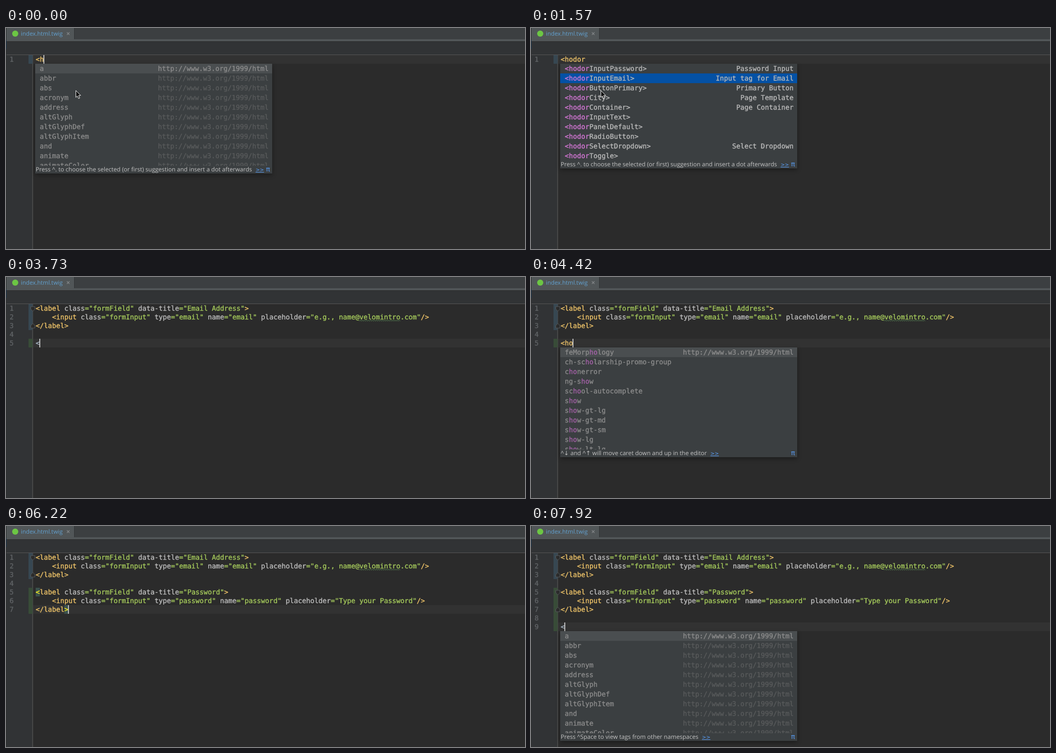
An HTML page that plays this animation: 1014x433 px, repeating every 8000 ms.

```html
<!DOCTYPE html>
<html lang="en">
<head>
<meta charset="utf-8">
<title>Live template completion</title>
<style>
  html, body { margin: 0; height: 100%; overflow: hidden; background: #2b2b2b; }
  svg { display: block; }
  text { white-space: pre; text-rendering: geometricPrecision; }
  .code { font: 13.31px "DejaVu Sans Mono", monospace; stroke-width: .35px; }
  .ui { font: 11.6px "Open Sans", "DejaVu Sans", sans-serif; fill: #c4c4c4; }
  .link { font: 9.8px "DejaVu Sans", sans-serif; fill: #589df6; }
  .popup { fill: #3b3f41; filter: drop-shadow(0 3px 4px rgba(0, 0, 0, .35)); }
</style>
</head>
<body>
<svg width="1014" height="433" viewBox="0 0 1014 433">
  <rect width="1014" height="433" fill="#2b2b2b"/>
  <rect width="1014" height="22" fill="#3c3f41"/>
  <rect x="1" width="132" height="23" fill="#515658"/>
  <rect x="133" width="1" height="22" fill="#313335"/>
  <rect y="22" width="1014" height="4" fill="#515658"/>
  <rect y="26" width="1014" height="1" fill="#2b2b2b"/>
  <rect y="27" width="1014" height="25" fill="#313335"/>
  <rect y="53" width="51" height="380" fill="#313335"/>
  <rect x="51" y="53" width="2" height="380" fill="#464747"/>
  <rect y="52" width="1014" height="1" fill="#555"/>
  <rect width="1" height="433" fill="#2a2c2d"/>
  <rect y="24" width="1" height="17" fill="#17304a"/>
  <circle cx="18" cy="11" r="6" fill="#6cc644"/>
  <text class="ui" x="29" y="15" style="font-size:11.42px;fill:#62a0cf">index.html.twig</text>
  <path d="M119 8.5l5 5m0-5l-5 5" stroke="#85888a" stroke-width="1.1"/>
  <g id="view"></g>
</svg>
<script>
const LOOP = 8000, LEFT = 58, TOP = 53, CH = 8, LINE = 17, ITEM = 19;
const TAG = '#efc469', ATTR = '#bebebe', VALUE = '#a6cb5c';

const snippets = [[
  '<label class="formField" data-title="Email Address">',
  '    <input class="formInput" type="email" name="email" placeholder="e.g., name@velomintro.com"/>',
  '</label>'
], [
  '<label class="formField" data-title="Password">',
  '    <input class="formInput" type="password" name="password" placeholder="Type your Password"/>',
  '</label>'
]];

const url = 'http://www.w3.org/1999/html';
const elements = 'a abbr abs acronym address altGlyph altGlyphDef altGlyphItem and animate animateColor'
  .split(' ').map(name => [name, url]);
const partial = ('feMorphology ch-scholarship-promo-group chonerror ng-show school-autocomplete ' +
  'show show-gt-lg show-gt-md show-gt-sm show-lg show-lt-lg')
  .split(' ').map((name, i) => [name, i ? '' : url]);
const templates = [
  ['InputPassword', 'Password Input'], ['InputEmail', 'Input tag for Email'],
  ['ButtonPrimary', 'Primary Button'], ['City', 'Page Template'],
  ['Container', 'Page Container'], ['InputText', ''], ['PanelDefault', ''],
  ['RadioButton', ''], ['SelectDropdown', 'Select Dropdown'], ['Toggle', '']
].map(([name, note]) => [`<hodor${name}>`, note]);

const hints = [
  'Press ^. to choose the selected (or first) suggestion and insert a dot afterwards',
  '^↓ and ^↑ will move caret down and up in the editor',
  'Press ^Space to view tags from other namespaces'
];

// Each step changes part of the editor state.
// match: 2 = paired brackets with background, 1 = only coloured
const type = (typed, list) => ({ typed, list, query: list === templates ? typed : list === partial ? 'ho' : '' });
const steps = [
  [0, { done: 0, row: 0, end: 0, hint: 0, caret: 1, mouse: 1, folds: 0, typo: 0, green: 0,
        focus: 0, match: 0, ...type('<h', elements) }],
  [60, type('<ho', partial)],
  [230, type('<hod', templates)],
  [440, type('<hodo', templates)],
  [620, type('<hodor', templates)],
  [1510, { focus: 1 }],
  [1570, { caret: 0 }],
  [2050, { caret: 1 }],
  [2110, { mouse: 0 }],
  [2260, { done: 1, row: 2, end: 8, match: 2, focus: 0, ...type('') }],
  [2560, { folds: 1 }],
  [2710, { typo: 1 }],
  [2890, { row: 3, end: 0, match: 1 }],
  [3130, { row: 4 }],
  [3550, { match: 0 }],
  [3730, { green: 5, ...type('<') }],
  [4030, { hint: 1, ...type('<', elements) }],
  [4330, type('<h', elements)],
  [4420, type('<ho', partial)],
  [4510, type('<hod', templates)],
  [4660, type('<hodo', templates)],
  [4780, type('<hodor', templates)],
  [5560, { caret: 0 }],
  [6040, { caret: 1 }],
  [6220, { done: 2, row: 6, end: 8, match: 2, green: 7, ...type('') }],
  [6510, { folds: 2 }],
  [6600, { row: 7, end: 0, match: 1 }],
  [6690, { row: 8 }],
  [6780, { match: 0 }],
  [7560, type('<')],
  [7680, { green: 9 }],
  [7860, { hint: 2, ...type('<', elements) }]
];

const esc = s => s.replace(/&/g, '&amp;').replace(/</g, '&lt;');
const rect = (x, y, w, h, fill) => `<rect x="${x}" y="${y}" width="${w}" height="${h}" fill="${fill}"/>`;
const span = (s, color) => `<tspan fill="${color}" stroke="${color}">${esc(s)}</tspan>`;
const code = (x, y, body, extra = '') => `<text class="code" x="${x}" y="${y}" ${extra}>${body}</text>`;
const rowY = row => TOP + row * LINE;

function markup(line) {
  return line.replace(/(<\/?\w*|\/?>)|(="[^"]*")|([^<>="]+)/g,
    (s, tag, value) => span(s, tag ? TAG : value ? VALUE : ATTR));
}

function bracket(col, row, ch, s) {
  const x = LEFT + col * CH, y = rowY(row);
  const back = s.match === 2 ? '#3b514d' : row === s.row ? '#323232' : '#2b2b2b';
  return rect(x, y, CH, LINE, back) + code(x, y + 13, span(ch, '#fff21c'), 'font-weight="bold"');
}

function fold(row, dir) {
  const y = rowY(row) + 9 - dir * 4;
  return `<path d="M48.5 ${y}h8v${5 * dir}l-4 ${4 * dir}l-4 ${-4 * dir}z" fill="#2b2b2b" stroke="#55585a"/>`;
}

function popup(s) {
  const top = rowY(s.row + 1), height = s.list === templates ? 190 : 200;
  const chosen = s.focus;
  let rows = '';
  s.list.forEach(([name, note], i) => {
    const y = i * ITEM, at = name.indexOf(s.query), to = at + s.query.length;
    const color = s.focus ? '#bbb' : '#8c8c8c';
    if (i === chosen) rows += rect(0, y, 463, ITEM, s.focus ? '#0451a5' : '#4a4e50');
    rows += code(9, y + 14, span(name.slice(0, at), color) +
      span(name.slice(at, to), s.focus ? '#d778d8' : '#a562a8') + span(name.slice(to), color));
    rows += code(456, y + 14, span(note, s.focus || i === chosen ? color : '#595b5c'), 'text-anchor="end"');
  });
  const base = top + height + 11;
  return `<rect class="popup" x="57" y="${top}" width="463" height="${height + 15}"/>` +
    `<svg x="57" y="${top}" width="463" height="${height}">${rows}</svg>` +
    `<text class="ui" x="58" y="${base}">${hints[s.hint]}` +
    `<tspan class="link" dx="7" text-decoration="underline">&gt;&gt;</tspan></text>` +
    `<text class="link" x="508" y="${base}" style="font-size:13px">π</text>`;
}

function draw(s) {
  let out = rect(53, rowY(s.row), 961, LINE, '#323232');
  out += rect(44, TOP, 8, s.done ? 3 * LINE : LINE, '#374752');
  if (s.green) out += rect(44, rowY(4), 8, (s.green - 4) * LINE, '#384c38');
  for (let i = 0; i <= s.row; i++) out += code(7, rowY(i) + 13, span(String(i + 1), '#606366'));

  for (let i = 0; i < s.done; i++) {
    snippets[i].forEach((line, j) => { out += code(LEFT, rowY(i * 4 + j) + 13, markup(line)); });
    if (i < s.folds) out += fold(i * 4, 1) + fold(i * 4 + 2, -1);
  }
  if (s.typo) out += `<path d="M690 86.5${'l2 -2l2 2'.repeat(20)}" fill="none" stroke="#5f8f58" stroke-width=".9"/>`;
  if (s.match) {
    const first = (s.done - 1) * 4;
    out += bracket(0, first, '<', s) + bracket(7, first + 2, '>', s);
  }

  const y = rowY(s.row);
  out += code(LEFT, y + 13, span(s.typed, s.typed === '<' ? '#a9b7c6' : TAG));
  if (s.caret) out += rect(LEFT - 1 + CH * (s.typed.length || s.end), y, 2, LINE, '#bbb');
  if (s.list) out += popup(s);
  if (s.mouse) out += '<path d="M136.5 122.5v13.5l3-2.8l2.2 5l2.4-1l-2.2-5h4.2z" fill="#111" stroke="#eee"/>';
  return out;
}

const view = document.getElementById('view');
let shown = -1;
function tick() {
  const t = performance.now() % LOOP;
  const count = steps.filter(([start]) => start <= t).length;
  if (count !== shown) {
    shown = count;
    view.innerHTML = draw(Object.assign({}, ...steps.slice(0, count).map(step => step[1])));
  }
  requestAnimationFrame(tick);
}
tick();
</script>
</body>
</html>
```
